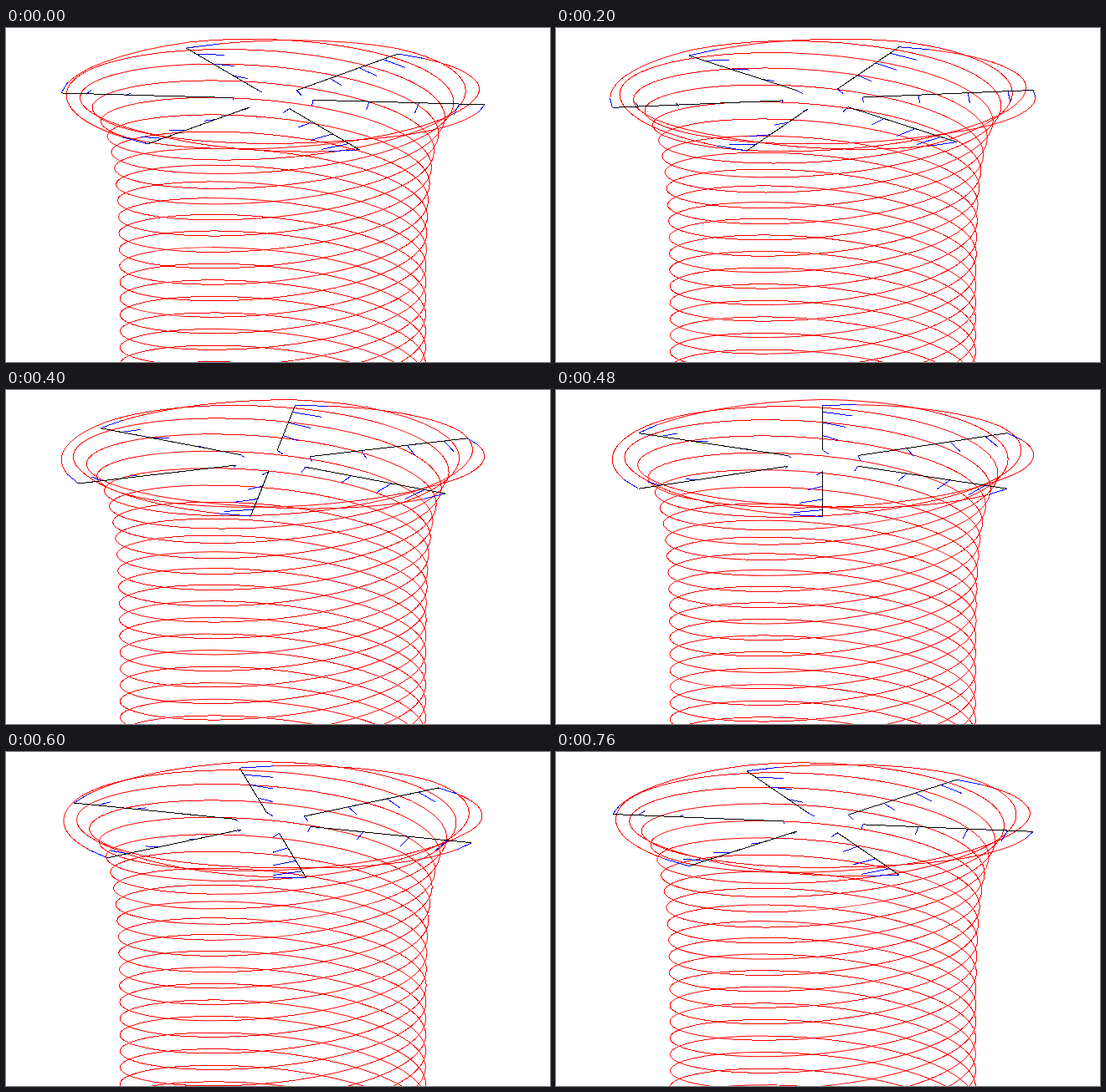
Animation of 650 by 400 pixels, one loop 800 ms. Source, as an HTML page without scripts:

```html
<!DOCTYPE html>
<html lang="en">
<head>
<meta charset="utf-8">
<title>Rotor wake</title>
<style>
/* Angles and wake age are counted in blade spacings of 60deg. */
@property --turn { syntax: "<number>"; inherits: true; initial-value: 0 }
@property --s0 { syntax: "<number>"; inherits: false; initial-value: 0 }
@property --s1 { syntax: "<number>"; inherits: false; initial-value: 0 }
@property --s2 { syntax: "<number>"; inherits: false; initial-value: 0 }
@property --r0 { syntax: "<number>"; inherits: false; initial-value: 0 }
@property --r1 { syntax: "<number>"; inherits: false; initial-value: 0 }
@property --r2 { syntax: "<number>"; inherits: false; initial-value: 0 }
@property --z0 { syntax: "<number>"; inherits: false; initial-value: 0 }
@property --z1 { syntax: "<number>"; inherits: false; initial-value: 0 }
@property --z2 { syntax: "<number>"; inherits: false; initial-value: 0 }
@property --x0 { syntax: "<number>"; inherits: false; initial-value: 0 }
@property --x1 { syntax: "<number>"; inherits: false; initial-value: 0 }
@property --x2 { syntax: "<number>"; inherits: false; initial-value: 0 }
@property --y0 { syntax: "<number>"; inherits: false; initial-value: 0 }
@property --y1 { syntax: "<number>"; inherits: false; initial-value: 0 }
@property --y2 { syntax: "<number>"; inherits: false; initial-value: 0 }

html, body { margin: 0; width: 100%; height: 100%; overflow: hidden; background: #fff }
svg {
  --cx: 318.9; --cy: 84.9; --rx: 254.4; --ry: 66.6;
  display: block;
  animation: spin 800ms steps(20) infinite;
}
@keyframes spin { from { --turn: 0 } to { --turn: 1 } }

/* Project three points given by age s, radius r and drop z. */
path {
  fill: none;
  stroke-width: 1;
  vector-effect: non-scaling-stroke;
  shape-rendering: crispEdges;
  --x0: calc(var(--cx) + var(--rx) * var(--r0) * cos((.9 + var(--k) + var(--turn) - var(--s0)) * 60deg));
  --x1: calc(var(--cx) + var(--rx) * var(--r1) * cos((.9 + var(--k) + var(--turn) - var(--s1)) * 60deg));
  --x2: calc(var(--cx) + var(--rx) * var(--r2) * cos((.9 + var(--k) + var(--turn) - var(--s2)) * 60deg));
  --y0: calc(var(--cy) + var(--z0) - var(--ry) * var(--r0) * sin((.9 + var(--k) + var(--turn) - var(--s0)) * 60deg));
  --y1: calc(var(--cy) + var(--z1) - var(--ry) * var(--r1) * sin((.9 + var(--k) + var(--turn) - var(--s1)) * 60deg));
  --y2: calc(var(--cy) + var(--z2) - var(--ry) * var(--r2) * sin((.9 + var(--k) + var(--turn) - var(--s2)) * 60deg));
}

/* A parabola through the three points; the wake contracts and sinks with age. */
.wake {
  stroke: #f00;
  --s0: max(.15, var(--i) + var(--j));
  --s2: calc(var(--i) + var(--j) + .5);
  --s1: calc((var(--s0) + var(--s2)) / 2);
  --r0: calc(.7175 + .2825 * exp(.4 * (1.2 - hypot(var(--s0), 1.2))));
  --r1: calc(.7175 + .2825 * exp(.4 * (1.2 - hypot(var(--s1), 1.2))));
  --r2: calc(.7175 + .2825 * exp(.4 * (1.2 - hypot(var(--s2), 1.2))));
  --z0: max(-9.4 * var(--s0), 19.57 * var(--s0) - 52.5 + 52.5 * exp(var(--s0) * (-.78 - .04 * var(--s0))));
  --z1: max(-9.4 * var(--s1), 19.57 * var(--s1) - 52.5 + 52.5 * exp(var(--s1) * (-.78 - .04 * var(--s1))));
  --z2: max(-9.4 * var(--s2), 19.57 * var(--s2) - 52.5 + 52.5 * exp(var(--s2) * (-.78 - .04 * var(--s2))));
  transform: matrix(
    calc(2 * var(--x1) - 1.5 * var(--x0) - .5 * var(--x2)),
    calc(2 * var(--y1) - 1.5 * var(--y0) - .5 * var(--y2)),
    calc(1.5 * var(--x2) - 2 * var(--x1) + .5 * var(--x0)),
    calc(1.5 * var(--y2) - 2 * var(--y1) + .5 * var(--y0)),
    var(--x0), var(--y0));
}

.edge, .chord {
  transform: matrix(
    calc(var(--x2) - var(--x0)), calc(var(--y2) - var(--y0)),
    calc(var(--y0) - var(--y2)), calc(var(--x2) - var(--x0)),
    var(--x0), var(--y0));
}
.edge { stroke: #000; --r0: .19; --r2: 1 }
.chord { stroke: #00f; --r0: var(--r); --r2: var(--r); --s2: .15; --z2: var(--z) }
</style>
</head>
<body>
<svg width="650" height="400" viewBox="0 0 650 400">
  <defs>
    <g id="arc">
      <path class="wake" d="M0 0Q1 0 1 1" style="--j:0"/>
      <path class="wake" d="M0 0Q1 0 1 1" style="--j:.5"/>
    </g>
    <g id="strand">
      <use href="#arc" style="--i:0"/>
      <use href="#arc" style="--i:1"/>
      <use href="#arc" style="--i:2"/>
      <use href="#arc" style="--i:3"/>
      <use href="#arc" style="--i:4"/>
      <use href="#arc" style="--i:5"/>
      <use href="#arc" style="--i:6"/>
      <use href="#arc" style="--i:7"/>
      <use href="#arc" style="--i:8"/>
      <use href="#arc" style="--i:9"/>
      <use href="#arc" style="--i:10"/>
      <use href="#arc" style="--i:11"/>
      <use href="#arc" style="--i:12"/>
      <use href="#arc" style="--i:13"/>
      <use href="#arc" style="--i:14"/>
      <use href="#arc" style="--i:15"/>
      <use href="#arc" style="--i:16"/>
      <use href="#arc" style="--i:17"/>
      <use href="#arc" style="--i:18"/>
      <use href="#arc" style="--i:19"/>
      <use href="#arc" style="--i:20"/>
      <use href="#arc" style="--i:21"/>
    </g>
    <g id="blade">
      <path class="chord" d="M0 0H1" style="--r:.19;--z:4.5"/>
      <path class="chord" d="M0 0H1" style="--r:.455;--z:5"/>
      <path class="chord" d="M0 0H1" style="--r:.69;--z:5"/>
      <path class="chord" d="M0 0H1" style="--r:.88;--z:4"/>
      <path class="chord" d="M0 0H1" style="--r:1;--z:-1.4"/>
      <path class="edge" d="M0 0H1"/>
    </g>
  </defs>
  <use href="#strand" style="--k:0"/>
  <use href="#strand" style="--k:1"/>
  <use href="#strand" style="--k:2"/>
  <use href="#strand" style="--k:3"/>
  <use href="#strand" style="--k:4"/>
  <use href="#strand" style="--k:5"/>
  <use href="#blade" style="--k:0"/>
  <use href="#blade" style="--k:1"/>
  <use href="#blade" style="--k:2"/>
  <use href="#blade" style="--k:3"/>
  <use href="#blade" style="--k:4"/>
  <use href="#blade" style="--k:5"/>
</svg>
</body>
</html>
```
